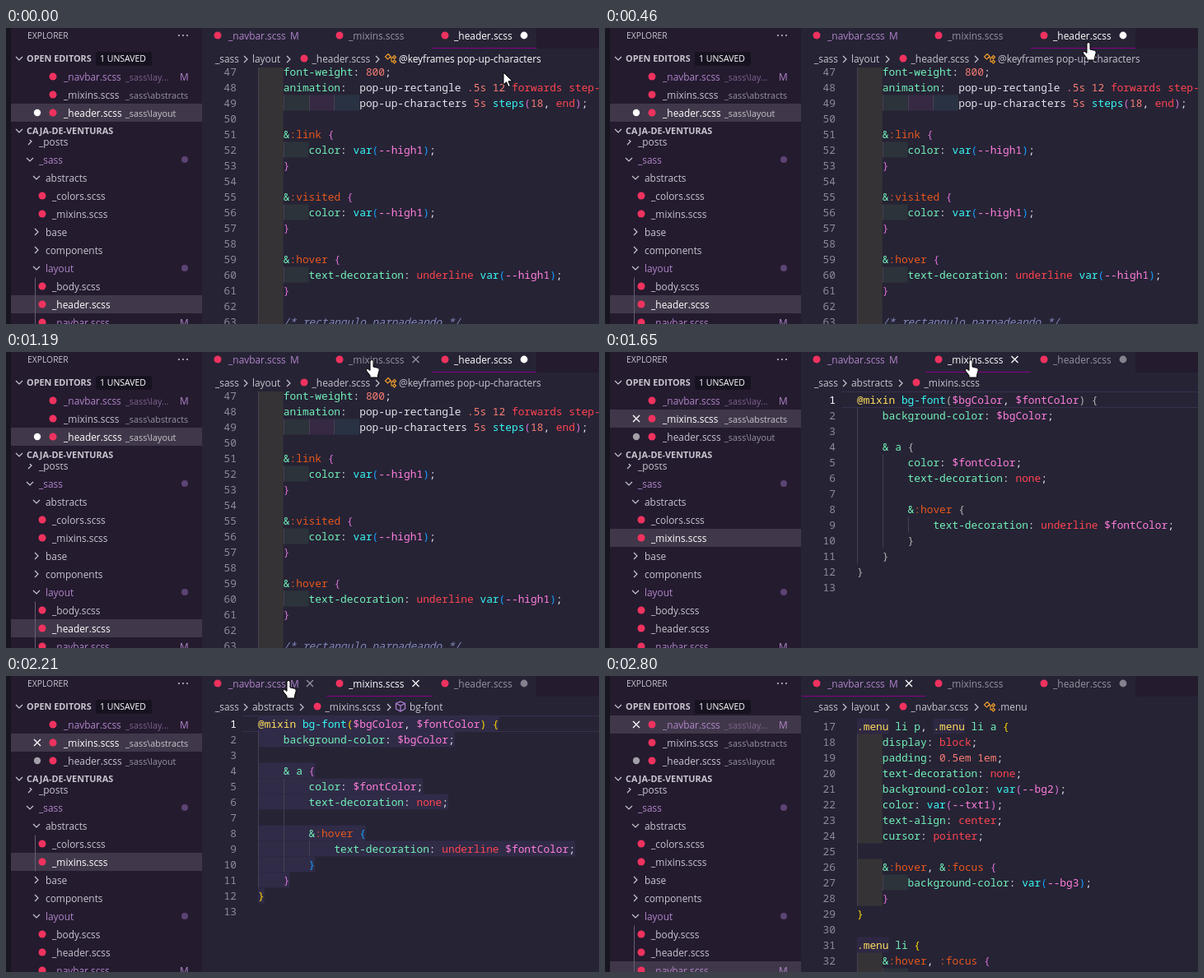
Recreate the animation shown at these times as an HTML page. Size 720 by 360 pixels, loop 4430 ms.

```html
<!DOCTYPE html>
<html lang="es">
<head>
<meta charset="utf-8">
<title>Editor tabs</title>
<style>
  html, body { margin: 0; width: 100%; height: 100%; overflow: hidden; background: #262335; }
  svg { display: block; width: 720px; height: 360px; }
  text { font-family: "Open Sans", "Noto Sans", sans-serif; font-size: 11.9px; white-space: pre; }
  .code { font-family: "Noto Sans Mono", "DejaVu Sans Mono", monospace; font-size: 12.83px; font-weight: 500; }
</style>
</head>
<body>
<svg viewBox="0 0 720 360" xmlns="http://www.w3.org/2000/svg">
  <g id="window"></g>
  <g id="pointer" fill="#fff" stroke="#000" stroke-linejoin="round">
    <path id="arrow" d="M0 0V15l3.5-3.3 2.5 5.8 2.4-1-2.5-5.7H11Z"/>
    <path id="hand" d="M-2 1.5a2 2 0 0 1 4 0V8l5.5 1.3q2 .6 1.7 3l-1.6 5.5V21H-2v-2.5L-6.3 13q-.8-2 .9-2.5 1.4-.2 3.4 2Z"/>
  </g>
</svg>
<script>
const LOOP = 4430, CODE_X = 306, CHAR = 7.7, LINE = 19;
const C = {
  editor: '#262335', side: '#241b2f', selected: '#40384a', white: '#ffffff',
  label: '#c8c5ce', dim: '#97939f', purple: '#b084c8', plain: '#e4e2ea', mark: '#f0325f',
  yellow: '#fede5d', green: '#72f1b8', red: '#fe4450', number: '#f97e72', pink: '#ff7edb',
  cyan: '#36f9f6', pseudo: '#e8571c', comment: '#848bbd', brace: '#b6b1b1'
};
const BRACKETS = ['#ffd700', '#da70d6', '#179fff'];
const RAINBOW = ['255,255,64', '127,255,127', '255,127,255', '79,236,236'];

const views = {
  header: {
    file: '_header.scss', folder: 'layout', tab: 2, row: 9, first: 47, y: 53, depth: 1,
    symbol: '@keyframes pop-up-characters', code: `
    font-weight: 800;
    animation:  pop-up-rectangle .5s 12 forwards step-end,
                pop-up-characters 5s steps(18, end);
    
    &:link {
        color: var(--high1);
    }
    
    &:visited {
        color: var(--high1);
    }
    
    &:hover {
        text-decoration: underline var(--high1);
    }
    
    /* rectangulo parpadeando */`
  },
  mixins: {
    file: '_mixins.scss', folder: 'abstracts', tab: 1, row: 4, first: 1, y: 58, depth: 0,
    symbol: 'bg-font', code: `
@mixin bg-font($bgColor, $fontColor) {
    background-color: $bgColor;

    & a {
        color: $fontColor;
        text-decoration: none;

        &:hover {
            text-decoration: underline $fontColor;
        }
    }
}
`
  },
  navbar: {
    file: '_navbar.scss', folder: 'layout', tab: 0, row: 10, first: 17, y: 61, depth: 0,
    symbol: '.menu', code: `
.menu li p, .menu li a {
    display: block;
    padding: 0.5em 1em;
    text-decoration: none;
    background-color: var(--bg2);
    color: var(--txt1);
    text-align: center;
    cursor: pointer;

    &:hover, &:focus {
        background-color: var(--bg3);
    }
}

.menu li {
    &:hover, :focus {
        color: var(--txt1);`
  }
};

const tabs = [
  { name: '_navbar.scss', x: 239, end: 389, icon: 257, close: 369 },
  { name: '_mixins.scss', x: 389, end: 517, icon: 405, close: 497.5 },
  { name: '_header.scss', x: 517, end: 644, icon: 533, close: 629 }
];

// [name, level, kind]
const tree = [
  ['_posts', 0, 'closed'], ['_sass', 0, 'open'], ['abstracts', 1, 'open'],
  ['_colors.scss', 2], ['_mixins.scss', 2], ['base', 1, 'closed'],
  ['components', 1, 'closed'], ['layout', 1, 'open'], ['_body.scss', 2],
  ['_header.scss', 2], ['_navbar.scss', 2]
];

// [time, x, y] of the pointer tip
const track = [
  [0, 604, 54], [360, 604, 54], [460, 587, 18], [700, 539, 3], [970, 539, 3],
  [1190, 444, 10], [1650, 444, 10], [1750, 438, 10], [2150, 344, 7], [2210, 343, 6]
];

const rect = (x, y, w, h, fill) => `<rect x="${x}" y="${y}" width="${w}" height="${h}" fill="${fill}"/>`;
const dot = (x, y, r, fill) => `<circle cx="${x}" cy="${y}" r="${r}" fill="${fill}"/>`;
const stroke = (x, y, d, color, w = 1.2) =>
  `<path transform="translate(${x} ${y})" d="${d}" fill="none" stroke="${color}" stroke-width="${w}"/>`;
const label = (x, y, s, fill, extra = '') => `<text x="${x}" y="${y + 4.6}" fill="${fill}" ${extra}>${s}</text>`;
const caps = (x, y, s, fill, size, weight = 400) =>
  `<text x="${x}" y="${y + 4}" fill="${fill}" style="font-size:${size}px;font-weight:${weight}">${s}</text>`;
const cross = (x, y, color) => stroke(x, y, 'M-4-4l8 8M4-4l-8 8', color, 1.3);
const chevron = (x, y, open, color = C.label) =>
  stroke(x, y, open ? 'M-4-2l4 4 4-4' : 'M-2-4l4 4-4 4', color);
const mark = (x, y) => dot(x, y, 4.5, C.mark);
const escapeText = s => s.replace(/&/g, '&amp;');

const rules = [
  [/^\/\*.*\*\//, C.comment], [/^@\w+/, C.yellow], [/^\.menu/, C.yellow],
  [/^:(hover|link|visited|focus)/, C.pseudo], [/^(\$|--)\w+/, C.pink],
  [/^[a-z][\w-]*(?=\()/, C.cyan], [/^[a-z-]+(?=:)/, C.green],
  [/^pop-up-\w+/, C.plain], [/^(&|(a|li|p)\b)/, C.green],
  [/^\.?\d[\w.]*/, C.number], [/^\w[\w-]*/, C.red],
  [/^[(){}]/, null], [/^[\s\S]/, C.plain]
];

function highlight(line, nest, ready) {
  let out = '';
  while (line) {
    const [rule, base] = rules.find(([r]) => r.test(line));
    const token = line.match(rule)[0];
    let color = base;
    if (!color) {
      const opens = '({'.includes(token);
      if (!opens) nest.depth--;
      color = ready ? BRACKETS[nest.depth % 3] : C.brace;
      if (opens) nest.depth++;
    }
    out += `<tspan fill="${color}">${escapeText(token)}</tspan>`;
    line = line.slice(token.length);
  }
  return out;
}

function drawCode(view, name, ready) {
  const lines = view.code.slice(1).split('\n');
  const nest = { depth: view.depth };
  const indentOf = s => s.match(/^ */)[0].length;
  let out = '';
  if (name === 'mixins') out += rect(287, 48, 433, 1, '#38304d') + rect(287, 67, 433, 1, '#38304d');
  lines.forEach((line, i) => {
    const y = view.y + i * LINE, top = y - 9.5;
    const filled = lines.slice(i).find(s => s.trim()) || '';
    const indent = indentOf(filled);
    const number = view.first + i;
    if (ready && name === 'mixins' && line)
      out += rect(CODE_X, top, line.length * CHAR, LINE, '#302b47');
    for (let k = 0; k < indent / 4; k++) {
      const x = CODE_X + k * 4 * CHAR;
      if (ready && name !== 'mixins' && k < indentOf(line) / 4)
        out += rect(x, top, 4 * CHAR, LINE, `rgba(${RAINBOW[k]},.075)`);
      out += rect(Math.round(x), top, 1, LINE, '#454153');
    }
    if (ready && name === 'navbar')
      for (const m of line.matchAll(/\.menu/g))
        out += rect(CODE_X + m.index * CHAR, top, 5 * CHAR, LINE, '#2e2843');
    const active = name === 'mixins' && i === 0;
    out += label(280, y, number, active ? C.white : '#8d8b97', 'class="code" text-anchor="end"');
    const italic = line.includes('/*') ? ' font-style="italic"' : '';
    if (line.trim())
      out += label(CODE_X + indent * CHAR, y, highlight(line.trim(), nest, ready), C.plain, 'class="code"' + italic);
  });
  return out;
}

function drawTabs(view, hover) {
  let out = rect(238, 0, 482, 25, C.editor) + rect(644, 0, 76, 25, C.side);
  tabs.forEach((tab, i) => {
    const active = view.tab === i;
    const color = active && i ? C.white : i ? C.dim : C.purple;
    if (active) out += rect(tab.x, 24, tab.end - tab.x, 1, '#880088');
    out += mark(tab.icon, 9) + label(tab.icon + (i === 0 ? 13 : 11), 9, tab.name, color);
    if (i === 0) out += label(345, 9, 'M', C.purple);
    if (i === 2) out += dot(tab.close, 9, 4.4, active ? C.white : '#85818d');
    else if (active || hover === i) out += cross(tab.close, 9, active ? C.white : C.dim);
  });
  return out;
}

function drawBreadcrumb(view, name, ready, bright) {
  const shift = view.folder === 'abstracts' ? 16 : 0;
  const end = 451 + (shift && 14);
  let out = rect(238, 25, 482, 23, C.editor);
  out += label(254, 37, '_sass', C.label) + chevron(291, 38) + label(299, 37, view.folder, C.label);
  out += chevron(343 + shift, 38) + mark(362 + shift, 37) + label(371.5 + shift, 37, view.file, C.label);
  if (!ready) return out;
  out += chevron(end, 38);
  out += name === 'mixins'
    ? stroke(479, 37, 'M0-6l5.5 2.5v6.5L0 6l-5.5-3v-6.5ZM-5.5-3.5L0-1l5.5-2.5M0-1V6', '#b180d7')
    : stroke(467, 37, 'M-3-5.5l3 3-3.5 3.5-3-3ZM-1-1h4M1-1v5h2M4.5-3.5l2 2-2 2-2-2ZM4.5 2l2 2-2 2-2-2Z', '#ee9d28');
  return out + label(name === 'mixins' ? 490 : 477, 37, view.symbol, bright ? C.white : C.label);
}

function drawSidebar(view, name, ready) {
  let out = rect(0, 0, 238, 360, C.side);
  const guide = name === 'header' || (name === 'navbar' && ready) ? [303.5, 57]
    : name === 'navbar' || ready ? [193.5, 44] : null;

  tree.forEach(([text, level, kind], i) => {
    const y = 138 + i * 22, x = 40 + level * 8;
    const modified = text === '_sass' || text === 'layout' || text === '_navbar.scss';
    const selected = i === view.row;
    if (selected) out += rect(6, y - 11, 232, 22, C.selected);
    out += kind ? chevron(x - 11, y, kind === 'open') : mark(44, y);
    out += label(x, y, text, modified ? C.purple : selected ? C.white : C.label);
    if (modified) out += kind ? dot(217, y, 4, '#5b4473') : label(211, y, 'M', C.purple);
  });
  if (guide) out += rect(35, guide[0], 1, guide[1], '#665e70');

  out += rect(6, 0, 232, 136, C.side);
  out += caps(26, 9, 'EXPLORER', C.label, 10.35);
  for (const x of [210, 215, 220]) out += dot(x, 9, 1, C.label);
  out += chevron(16, 37, true) + caps(25, 37, 'OPEN EDITORS', C.label, 10.86, 700);
  out += `<rect x="109" y="29" width="68" height="17" rx="2" fill="#17121f"/>`;
  out += caps(114, 37, '1 UNSAVED', C.white, 10.5);
  out += chevron(16, 125, true) + caps(25, 125, 'CAJA-DE-VENTURAS', C.label, 10.86, 700);

  ['lay...', 'abstracts', 'layout'].forEach((folder, i) => {
    const y = 59 + i * 22, active = view.tab === i;
    const color = i === 0 ? C.purple : active ? C.white : C.label;
    const faint = i === 0 ? '#80628f' : active ? C.label : C.dim;
    if (active) out += rect(6, y - 11, 232, 22, C.selected);
    if (i === 2) out += dot(38, y, 4.2, active ? C.white : '#a39fa9');
    else if (active) out += cross(38, y, C.white);
    out += mark(57, y) + label(70, y, tabs[i].name, color);
    out += label(145, y, '_sass\\' + folder, faint, 'style="font-size:10.8px"');
  });
  out += label(211, 59, 'M', C.purple);
  return out + rect(0, 0, 6, 360, '#171520');
}

function pointerAt(t) {
  const next = track.findIndex(key => key[0] > t);
  if (next < 0) return track[track.length - 1].slice(1);
  const [t0, x0, y0] = track[next - 1], [t1, x1, y1] = track[next];
  const k = (t - t0) / (t1 - t0);
  return [x0 + (x1 - x0) * k, y0 + (y1 - y0) * k];
}

const $ = id => document.getElementById(id);
let shown = '';

function render(t) {
  const name = t < 1650 ? 'header' : t < 2570 ? 'mixins' : 'navbar';
  const ready = name === 'header' || t >= (name === 'mixins' ? 1900 : 2690);
  const [x, y] = pointerAt(t);
  const visible = t < 2760;
  const onTabs = y < 26;
  const hover = visible && onTabs ? tabs.findIndex(tab => x >= tab.x && x < tab.end) : -1;
  const bright = name === 'header' && t < 380;
  const key = [name, ready, hover, bright].join();
  if (key !== shown) {
    const view = views[name];
    $('window').innerHTML = rect(0, 0, 720, 360, C.editor) + drawCode(view, name, ready) +
      drawBreadcrumb(view, name, ready, bright) + drawTabs(view, hover) + drawSidebar(view, name, ready);
    shown = key;
  }
  $('pointer').setAttribute('transform', `translate(${Math.round(x)} ${Math.round(y)})`);
  $('pointer').setAttribute('display', visible ? 'inline' : 'none');
  $('arrow').setAttribute('display', onTabs ? 'none' : 'inline');
  $('hand').setAttribute('display', onTabs ? 'inline' : 'none');
}

const start = performance.now();
function tick() {
  render((performance.now() - start) % LOOP);
  requestAnimationFrame(tick);
}
tick();
</script>
</body>
</html>
```
